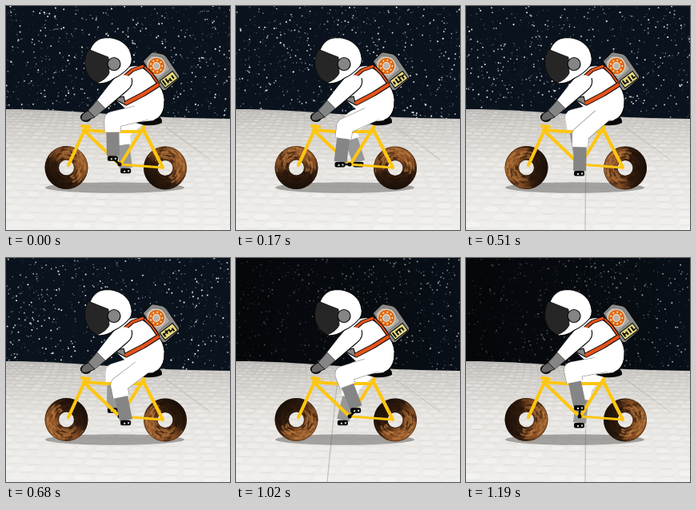
An HTML page with a canvas that plays this animation: 280x280 px, repeating every 1360 ms.

```html
<!DOCTYPE html>
<html lang="en">
<head>
<meta charset="utf-8">
<title>Astronaut on a doughnut bike</title>
<style>
html, body { margin: 0; width: 100%; height: 100%; overflow: hidden; background: #eceae6; }
canvas { display: block; width: 280px; height: 280px; }
</style>
</head>
<body>
<canvas id="stage" width="280" height="280"></canvas>
<script>
const c = document.getElementById('stage').getContext('2d');
const STEP = 170, STEPS = 8, TAU = Math.PI * 2;
const INK = '#080808', WHITE = '#fff', GREY = '#858585', YELLOW = '#fdc611', ORANGE = '#e6531b';

function random(seed) {
  let s = seed * 7919 + 17;
  return () => {
    s = (s + 0x6D2B79F5) | 0;
    let t = Math.imul(s ^ (s >>> 15), 1 | s);
    t ^= t + Math.imul(t ^ (t >>> 7), 61 | t);
    return ((t ^ (t >>> 14)) >>> 0) / 4294967296;
  };
}

function shape(d, fill, line = INK, width = 1.1) {
  const p = new Path2D(d);
  if (fill) { c.fillStyle = fill; c.fill(p); }
  if (line) { c.strokeStyle = line; c.lineWidth = width; c.stroke(p); }
}

function disc(x, y, rx, ry, fill, line) {
  c.beginPath();
  c.ellipse(x, y, rx, ry, 0, 0, TAU);
  c.fillStyle = fill;
  c.fill();
  if (line) { c.strokeStyle = line; c.lineWidth = 1.2; c.stroke(); }
}

function bar(points, width, color, cap = 'round') {
  c.beginPath();
  points.forEach(p => c.lineTo(p[0], p[1]));
  c.lineWidth = width;
  c.lineCap = cap;
  c.lineJoin = 'round';
  c.strokeStyle = color;
  c.stroke();
}

function edged(points, width, color) {
  bar(points, width + 2, INK, 'butt');
  bar(points, width, color, 'butt');
}

const mix = (a, b, t) => [a[0] + (b[0] - a[0]) * t, a[1] + (b[1] - a[1]) * t];

function sky(k) {
  const rnd = random(k + 3);
  c.fillStyle = '#0a131d';
  c.fillRect(0, 0, 280, 145);
  for (let i = 0; i < 1500; i++) {
    const x = rnd() * 280, y = rnd() * 143, b = rnd() ** 2.6;
    c.fillStyle = `rgba(${130 + b * 120}, ${165 + b * 85}, ${195 + b * 55}, ${0.15 + b * 0.8})`;
    const r = 0.4 + b * 0.65;
    c.beginPath();
    c.arc(x, y, r, 0, TAU);
    c.fill();
  }
  // The light fades from the left late in the loop
  if (k > 4) {
    const g = c.createLinearGradient(0, 0, 280, 0);
    g.addColorStop(0, 'rgba(3,3,4,.8)');
    g.addColorStop(1, 'rgba(3,3,4,.25)');
    c.fillStyle = g;
    c.fillRect(0, 0, 280, 145);
  }
}

function ground(k) {
  const rnd = random(k + 40);
  const g = c.createLinearGradient(0, 128, 0, 280);
  g.addColorStop(0, '#bbb9b5');
  g.addColorStop(0.15, '#cfccc8');
  g.addColorStop(0.45, '#e5e3df');
  g.addColorStop(1, '#efeeec');
  c.save();
  c.beginPath();
  c.moveTo(0, 129);
  c.bezierCurveTo(90, 129, 130, 139, 280, 141);
  c.lineTo(280, 280);
  c.lineTo(0, 280);
  c.clip();
  c.fillStyle = g;
  c.fillRect(0, 120, 280, 160);
  // Woven rows, larger towards the viewer
  for (let y = 133, row = 0; y < 285; row++) {
    const h = 3 + (y - 130) * 0.055, w = h * 2.5;
    for (let x = -w + (k / 4 + (row % 2) / 2) * w; x < 280 + w; x += w) {
      const yy = y + x * 0.025 + rnd() - 0.5;
      disc(x, yy, w * 0.4, h * 0.33, `rgba(255,255,255,${0.08 + rnd() * 0.24})`);
      disc(x, yy + h * 0.45, w * 0.4, 0.7, `rgba(130,122,112,${0.03 + rnd() * 0.07})`);
    }
    y += h;
  }
  bar([[200, 152], [255, 192]], 1.3, 'rgba(160,148,128,.3)');
  // A seam that slides past with the ground
  if (k > 1) {
    const s = k - 2;
    bar([[126 + 24 * s, 160], [114 + 35 * s, 280]], 1.4, 'rgba(150,143,132,.45)');
  }
  c.restore();
}

function wheel(x, y, k) {
  const rnd = random(9);
  c.save();
  c.translate(x, y);
  c.rotate((135 - 45 * k) * Math.PI / 180);
  c.beginPath();
  c.arc(0, 0, 27, 0, TAU);
  c.moveTo(9.5, 0);
  c.arc(0, 0, 9.5, 0, TAU);
  c.clip('evenodd');
  const g = c.createLinearGradient(-27, 0, 27, 0);
  g.addColorStop(0, '#9a602f');
  g.addColorStop(0.4, '#804a22');
  g.addColorStop(0.62, '#382010');
  g.addColorStop(1, '#170e08');
  c.fillStyle = g;
  c.fillRect(-30, -30, 60, 60);
  for (let i = 0; i < 110; i++) {
    const a = rnd() * TAU, r = 11 + rnd() * 15, lit = Math.cos(a) < 0.25 && rnd() < 0.5;
    c.beginPath();
    c.arc(0, 0, r, a, a + 0.1 + rnd() * 0.28);
    c.lineWidth = 1 + rnd() * 2.2;
    c.lineCap = 'round';
    c.strokeStyle = lit ? 'rgba(196,128,66,.55)' : 'rgba(32,18,9,.42)';
    c.stroke();
  }
  c.lineWidth = 2;
  c.strokeStyle = 'rgba(30,16,8,.5)';
  for (const r of [10, 27]) {
    c.beginPath();
    c.arc(0, 0, r, 0, TAU);
    c.stroke();
  }
  c.restore();
}

const CRANK = [142, 198];

function leg(angle, hip, boot, line) {
  const foot = [CRANK[0] + 11.5 * Math.cos(angle), CRANK[1] + 11 * Math.sin(angle)];
  const ankle = [foot[0], foot[1] - 3];
  // Two-bone solve with the knee pointing forward
  const dx = ankle[0] - hip[0], dy = ankle[1] - hip[1], d = Math.hypot(dx, dy);
  const along = (44 * 44 - 45 * 45 + d * d) / (2 * d);
  const out = Math.sqrt(Math.max(0, 44 * 44 - along * along));
  const knee = [hip[0] + (dx * along - dy * out) / d, hip[1] + (dy * along + dx * out) / d];
  const cuff = mix(knee, ankle, 0.34);
  bar([CRANK, foot], 2.5, INK);
  bar([cuff, ankle], 16, boot, 'butt');
  bar([hip, knee, cuff], 21, line, 'butt');
  bar([hip, knee, cuff], 20, WHITE, 'butt');
  c.fillStyle = INK;
  c.beginPath();
  c.roundRect(foot[0] - 7, foot[1] - 3, 13, 6.5, 2);
  c.fill();
  c.fillStyle = '#ddd';
  c.fillRect(foot[0] - 3, foot[1], 2, 2);
  c.fillRect(foot[0] + 2, foot[1] - 0.5, 2, 2);
}

function frame() {
  const tubes = [
    [[100, 151], [78, 199]],
    [[97, 155], [125, 157], [170, 157]],
    [[100, 158], [142, 198]],
    [[173, 150], [143, 198]],
    [[171, 153], [196, 202]]
  ];
  tubes.forEach(t => bar(t, 4.2, YELLOW));
  bar([[142, 198], [196, 202]], 3, YELLOW);
  bar([[95, 150], [104, 151]], 4, YELLOW);
  disc(...CRANK, 2.5, 2.5, INK);
  shape('M162 146Q168 141 178 140L188 136Q196 140 195 146Q187 150 173 149Z', INK, null);
}

function pack(k) {
  shape('M171 69L181 59Q183 57 186 58L196 60Q199 61 201 64L216 86Q218 89 215 92L200 105Q197 107 194 104Z', '#8b8b89');
  shape('M174 70L182 62L195 64L205 79L190 92Z', '#aaa8a2', '#666', 0.7);
  disc(188, 75, 11.5, 11.5, '#d8d4cb');
  disc(188, 75, 10.3, 10.3, '#df6a14');
  for (let i = 0; i < 9; i++) {
    const a = i / 9 * TAU;
    disc(188 + 7.3 * Math.cos(a), 75 + 7.3 * Math.sin(a), 1, 1, '#fff0d8');
  }
  disc(188, 75, 4.3, 4.3, '#b9b5b0', '#f0dfc8');
  c.save();
  c.translate(203.5, 92);
  c.rotate(-0.65);
  c.fillStyle = INK;
  c.fillRect(-10.5, -6, 21, 12);
  c.fillStyle = '#e6d882';
  c.fillRect(-9.5, -5, 19, 10);
  const rnd = random(k + 70);
  c.fillStyle = INK;
  for (let i = 0; i < 4; i++) {
    const x = -8 + i * 4.3, h = 4 + rnd() * 3.5;
    c.fillRect(x, -4 + rnd() * (8 - h), 2, h);
    if (rnd() < 0.6) c.fillRect(x, -3.5 + rnd() * 5.5, 4.3, 1.6);
  }
  c.restore();
}

function body(k) {
  pack(k);
  // Far arm and glove
  bar([[127, 117], [108, 132]], 10, GREY);
  disc(100, 139, 6.5, 5.5, '#222', INK);
  shape('M137 87Q151 74 165 75Q182 83 191 98Q200 111 198 125Q196 139 185 143L157 146Q143 149 135 157L129 149Q138 131 150 129L136 116Z', WHITE, null);
  shape('M191 98Q200 111 198 125Q196 139 185 143', null);
  shape('M135 116L147 113L150 124Z', GREY);
  // Harness
  edged([[173, 76], [182, 85], [191, 98]], 2, ORANGE);
  edged([[172, 75], [158, 80], [144, 92]], 3, ORANGE);
  edged([[191, 98], [172, 110], [149, 122]], 4.4, ORANGE);
  // Near arm
  shape('M137 89Q148 83 157 90Q160 99 151 106L124 129L113 119L127 101Z', WHITE, null);
  shape('M157 90Q160 99 151 106L124 129', null);
  shape('M114 118L124 128L111 139L101 133Z', GREY, '#444', 0.8);
  shape('M103 131Q95 134 94 140Q95 144 101 143L111 139Z', '#686868', INK, 0.8);
}

function helmet() {
  shape('M104 58Q109 40 126 39.5Q145 40 154 54Q160 67 155 75Q147 85 136 90Q127 97 116 97Q101 90 99 76Q99 67 104 58Z', WHITE);
  shape('M103 54Q115 59 128 64L129 84Q125 92 114 96Q102 89 98.5 75Q98 63 103 54Z', '#262626', INK, 0.8);
  disc(135, 72.5, 8, 8, GREY, INK);
}

function draw(k) {
  const angle = (-135 - 45 * k) * Math.PI / 180;
  sky(k);
  ground(k % 4);
  disc(136, 227, 87, 6.7, 'rgba(105,103,101,.55)');
  wheel(75.5, 202, k);
  wheel(199, 202.5, k);
  leg(angle + Math.PI, [177, 129], '#979797', '#ddd');
  frame();
  body(k);
  leg(angle, [176, 132], GREY, '#777');
  // Hip blends the near thigh into the suit
  shape('M160 121Q178 112 191 119Q200 130 190 140Q183 143 174 142L163 136Z', WHITE, null);
  shape('M198 118Q199 137 185 143', null);
  helmet();
}

let shown = -1;
const start = performance.now();
function tick() {
  const k = Math.floor((performance.now() - start) / STEP) % STEPS;
  if (k !== shown) draw(shown = k);
  requestAnimationFrame(tick);
}
tick();
</script>
</body>
</html>
```
